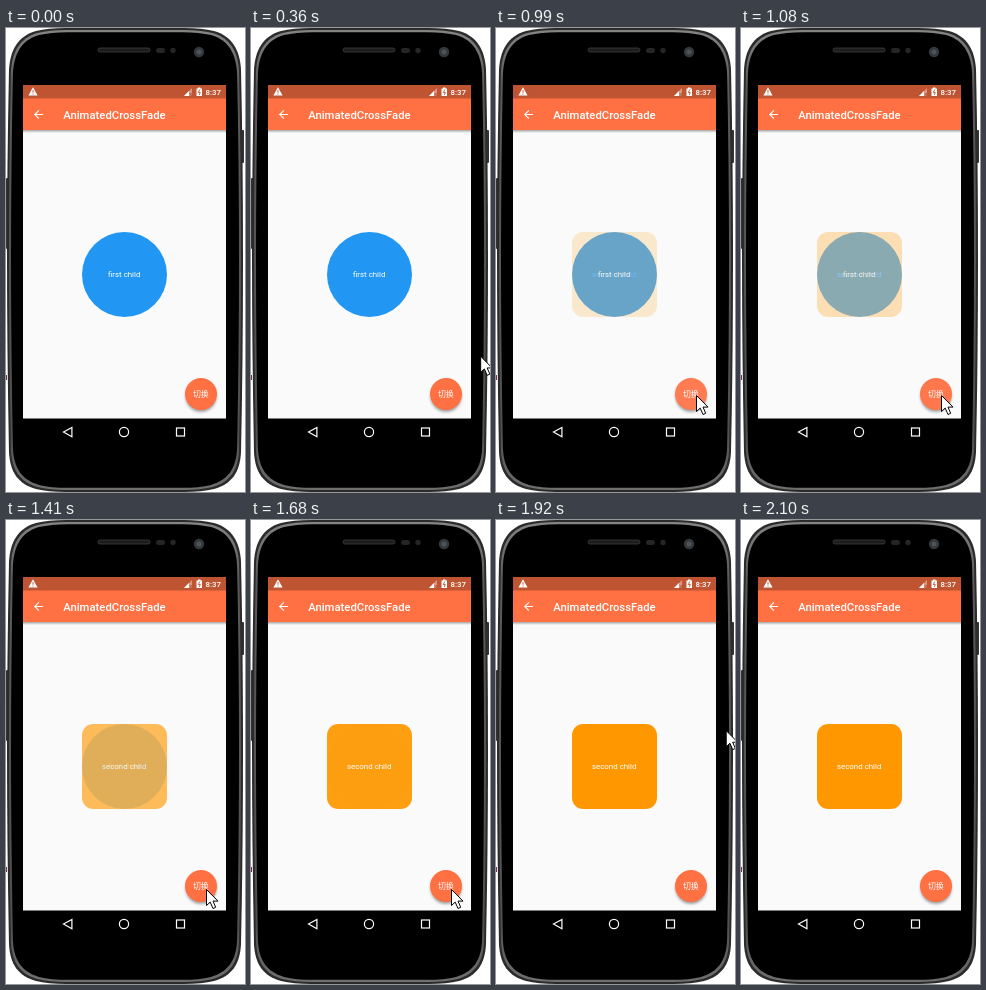
Write an HTML page that moves like this. It is 239 px wide and 464 px high and loops after 2580 ms.

```html
<!DOCTYPE html>
<html lang="en">
<head>
<meta charset="utf-8">
<title>Cross fade</title>
<style>
  html, body { margin: 0; width: 100%; height: 100%; overflow: hidden; background: #fff; }
  svg { display: block; width: 239px; height: 464px; }
  text { font-family: Roboto, "Noto Sans CJK SC", "Noto Sans CJK", sans-serif; font-size: 7.9px; fill: #fff; }
  .mid { text-anchor: middle; }
  .medium { font-weight: 500; }
</style>
</head>
<body>
<svg viewBox="0 0 239 464">
  <defs>
    <path id="body" d="M-116-190C-115-210-107-224-89-229Q-77-232-59-232H59Q77-232 89-229C107-224 115-210 116-190Q118-102 118-2T116 192C115 212 107 224 89 229Q77 232 59 232H-59Q-77 232-89 229C-107 224-115 212-116 192Q-118 88-118-2T-116-190Z"/>
    <linearGradient id="rim" x2="0" y2="1">
      <stop offset="0" stop-color="#858585"/>
      <stop offset=".12" stop-color="#5a5a5a"/>
      <stop offset=".88" stop-color="#505050"/>
      <stop offset="1" stop-color="#707070"/>
    </linearGradient>
    <linearGradient id="shade" x2="0" y2="1">
      <stop offset="0" stop-opacity=".34"/>
      <stop offset="1" stop-opacity="0"/>
    </linearGradient>
    <filter id="blur" x="-30%" y="-30%" width="160%" height="160%"><feGaussianBlur stdDeviation="1.5"/></filter>
    <clipPath id="fabClip"><circle cx="195" cy="366" r="16"/></clipPath>
  </defs>

  <!-- phone -->
  <rect x="0" y="150" width="4" height="71" rx="1" fill="#333"/>
  <rect x="234" y="102" width="4" height="33" rx="1" fill="#333"/>
  <rect x="0" y="347" width="1" height="5" fill="#7d2c62"/>
  <g transform="translate(119 232)">
    <use href="#body" fill="#2b2b2b"/>
    <use href="#body" transform="scale(.983 .991)" fill="url(#rim)"/>
    <use href="#body" transform="scale(.966 .982)"/>
  </g>
  <rect x="92" y="20" width="52" height="4" rx="2" fill="#1c1c1c" stroke="#3d3d3d" stroke-width=".8"/>
  <g fill="#252525">
    <rect x="150" y="20" width="9" height="5" rx="2.500"/>
    <circle cx="167" cy="22.500" r="2.700"/>
  </g>
  <circle cx="193" cy="24" r="5.200" fill="#34383b"/>
  <circle cx="193" cy="24" r="2.500" fill="#4d5459"/>

  <!-- app -->
  <rect x="17" y="57" width="203" height="333.500" fill="#fafafa"/>
  <rect x="17" y="102" width="203" height="3" fill="url(#shade)"/>
  <rect x="17" y="57" width="203" height="14" fill="#bf5432"/>
  <rect x="17" y="70.500" width="203" height="31.500" fill="#ff7043"/>

  <g fill="#fff">
    <path d="M27 59.200L31.600 67.500H22.400Z"/>
    <path d="M178 68L186 60V68Z" opacity=".4"/>
    <path d="M178 68L183 63V68Z"/>
    <path d="M190.500 60.500H192V59.500H194.500V60.500H196V68H190.500Z"/>
    <path transform="translate(25.700 79.700) scale(.564)" d="M20 11H7.830l5.590-5.590L12 4l-8 8 8 8 1.410-1.410L7.830 13H20z"/>
  </g>
  <path d="M27 62v2.800m0 .8v1M193.800 61.500l-1.500 3h2l-1.100 2.600M183.500 65l2.500 3m0-3l-2.500 3" fill="none" stroke="#bf5432" stroke-width=".9"/>
  <text class="medium" x="199.500" y="66.900">8:37</text>
  <text class="medium" x="57.200" y="90.500" style="font-size:11.300px">AnimatedCrossFade</text>

  <g id="first">
    <circle cx="118.500" cy="246.500" r="42.500" fill="#2196f3"/>
    <text class="mid" x="118.200" y="249.200">first child</text>
  </g>
  <g id="second">
    <rect x="76" y="204" width="85" height="85" rx="11.300" fill="#ff9800"/>
    <text class="mid" x="118.200" y="249.200">second child</text>
  </g>

  <circle cx="195" cy="368.300" r="15.400" opacity=".4" filter="url(#blur)"/>
  <circle cx="195" cy="366" r="16" fill="#ff7043"/>
  <g clip-path="url(#fabClip)"><circle id="ripple" cx="201" cy="367" fill="#fff"/></g>
  <text class="mid medium" x="194.800" y="369">切换</text>

  <!-- navigation -->
  <g fill="none" stroke="#fff" stroke-width="1.200">
    <path d="M65.900 399.400V408.800L57.500 404.100Z"/>
    <circle cx="118" cy="404" r="4.600"/>
    <rect x="170.500" y="400" width="8" height="8"/>
  </g>

  <path id="cursor" d="M0 0V16L3.700 12.600L6.500 19L9.200 17.800L6.500 11.600H11.500Z" fill="#fff" stroke="#000" stroke-width="1" stroke-linejoin="round"/>
</svg>
<script>
  const LOOP = 2580, TICK = 30;
  const [first, second, ripple, cursor] =
    ["first", "second", "ripple", "cursor"].map(id => document.getElementById(id));
  const clamp = v => Math.min(1, Math.max(0, v));
  const progress = (t, from, to) => clamp((t - from) / (to - from));

  // time, x, y of the pointer tip
  const track = [
    [330, 237, 321], [420, 215, 343], [510, 203, 363], [570, 200.5, 367.5],
    [1290, 200.5, 367.5], [1380, 200.5, 369.5], [1680, 200.5, 369.5],
    [1740, 202.5, 367.5], [1800, 214.5, 330.5], [1860, 227.5, 226.5], [2070, 237, 171]
  ];

  function pointerAt(t) {
    const i = Math.max(1, track.findIndex(p => p[0] >= t));
    const [a, b] = [track[i - 1], track[i]];
    const k = progress(t, a[0], b[0]);
    return [1, 2].map(n => a[n] + (b[n] - a[n]) * k);
  }

  function render(time) {
    const t = Math.floor((time % LOOP) / TICK) * TICK;

    const fade = progress(t, 830, 1745);
    first.setAttribute("opacity", 1 - fade);
    second.setAttribute("opacity", fade);

    ripple.setAttribute("r", 4 + 24 * progress(t, 750, 930));
    ripple.setAttribute("opacity", t < 780 ? 0 : .12 * (1 - progress(t, 900, 1200)));

    const shown = t >= 330 && t < 2100;
    cursor.setAttribute("visibility", shown ? "visible" : "hidden");
    if (shown) cursor.setAttribute("transform", `translate(${pointerAt(t)})`);
  }

  const start = performance.now();
  function frame() {
    render(performance.now() - start);
    requestAnimationFrame(frame);
  }
  render(0);
  requestAnimationFrame(frame);
</script>
</body>
</html>
```
